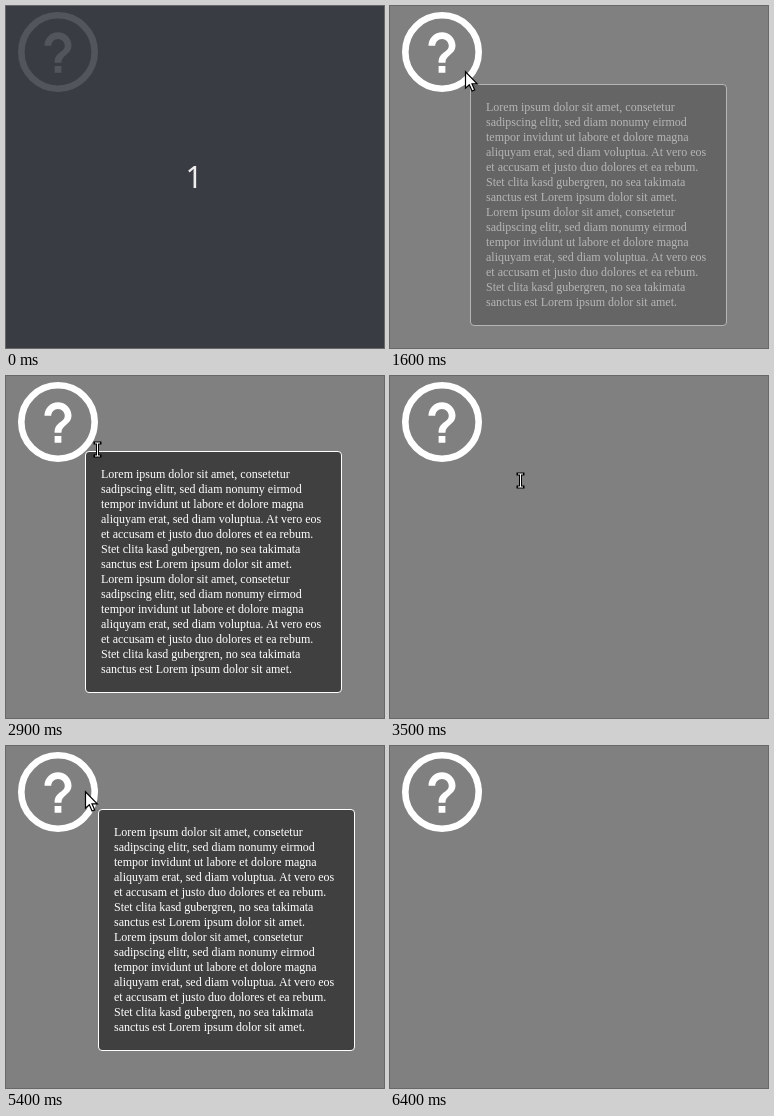
Write an HTML page that moves like this. It is 378x342 px and loops after 8.8 s.

```html
<!DOCTYPE html>
<html lang="en">
<head>
<meta charset="utf-8">
<title>Help tooltip</title>
<style>
html, body { margin: 0; width: 100%; height: 100%; overflow: hidden; background: #808080; }
#stage { position: relative; width: 378px; height: 342px; overflow: hidden; background: #808080; }
#stage > * { position: absolute; left: 0; top: 0; }
#icon { filter: blur(.5px); }
#tip {
  box-sizing: border-box; width: 257px; height: 242px; padding: 15px;
  border: 1px solid #fff; border-radius: 4px; background: #404040; color: #fff;
  font: 12px/15px "Liberation Serif", "Times New Roman", serif;
  white-space: pre; opacity: 0;
}
#count {
  width: 376px; height: 342px; padding-right: 2px; background: rgba(40, 43, 52, .8); color: #eee;
  font: 30px/342px "Noto Sans", sans-serif; text-align: center;
}
</style>
</head>
<body>
<div id="stage">
  <svg id="icon" width="378" height="342" fill="#fff">
    <circle cx="52" cy="46" r="36.7" fill="none" stroke="#fff" stroke-width="6.6"/>
    <path transform="translate(52 46.5) scale(3.38) translate(-12 -12)"
      d="M11 18h2v-2h-2zM12 6c-2.21 0-4 1.79-4 4h2c0-1.1.9-2 2-2s2 .9 2 2c0 2-3 1.75-3 5h2c0-2.25 3-2.5 3-5 0-2.21-1.79-4-4-4z"/>
  </svg>
  <div id="tip"></div>
  <svg width="378" height="342">
    <path id="arrow" d="M.5 .8V17.2L4.3 13.7 7.1 20 9.7 18.9 7 12.8H12.2Z"
      fill="#fff" stroke="#000" stroke-width="1.2"/>
    <g id="beam" fill="none">
      <path d="M-2-6H3M.5-6V7M-2 7H3" stroke="#000" stroke-width="3" stroke-linecap="square"/>
      <path d="M-2-6H3M.5-6V7M-2 7H3" stroke="#fff"/>
    </g>
  </svg>
  <div id="count">1</div>
</div>
<script>
const LOOP = 8800, STEP = 100, FADE = 400;
const ICON = { x: 52, y: 46, r: 40 };
const $ = id => document.getElementById(id);
const tip = $("tip"), arrow = $("arrow"), beam = $("beam"), count = $("count");

const lorem = `Lorem ipsum dolor sit amet, consetetur
sadipscing elitr, sed diam nonumy eirmod
tempor invidunt ut labore et dolore magna
aliquyam erat, sed diam voluptua. At vero eos
et accusam et justo duo dolores et ea rebum.
Stet clita kasd gubergren, no sea takimata
sanctus est Lorem ipsum dolor sit amet.`;
tip.textContent = lorem + "\n" + lorem;

// Moves: start, end, target x, target y
const pointer = {
  from: [280, 319],
  moves: [
    [700, 1500, 92, 89], [1500, 1800, 68, 56],
    [2800, 3500, 130.5, 104], [3600, 3700, 132.5, 109],
    [3800, 4500, 79, 45],
    [5400, 6100, 251, 219], [6200, 6300, 347, 288]
  ]
};
const tipPath = {
  from: [82, 84],
  moves: [[1500, 1800, 79, 75], [4000, 4300, 90, 64], [4300, 4400, 92, 63]]
};
// Tooltip visits: fade-in start, fade-out start
const visits = [[1500, 3000], [4060, 5600]];

const clamp = p => Math.max(0, Math.min(1, p));
const easeOut = p => 1 - (1 - p) ** 3;
const isShown = t => t === 400 || (t >= 700 && t < 6400);

// Approximates the CSS "ease" curve
const fade = p => 1 - (1 - clamp(p) ** 1.2) ** 2.6;

function locate({ from, moves }, t) {
  return moves.reduce(([x, y], [start, end, toX, toY]) => {
    const p = easeOut(clamp((t - start) / (end - start)));
    return [x + (toX - x) * p, y + (toY - y) * p];
  }, from);
}

function render(t) {
  count.style.display = t < 100 ? "" : "none";

  const [x, y] = locate(pointer, t);
  const overIcon = Math.hypot(x - ICON.x, y - ICON.y) < ICON.r;
  arrow.style.display = isShown(t) && overIcon ? "" : "none";
  beam.style.display = isShown(t) && !overIcon ? "" : "none";
  for (const shape of [arrow, beam]) {
    shape.setAttribute("transform", `translate(${Math.floor(x)} ${Math.floor(y)})`);
  }

  const [tx, ty] = locate(tipPath, t).map(Math.round);
  tip.style.transform = `translate(${tx}px, ${ty}px)`;
  tip.style.opacity = visits.reduce((sum, [on, off]) =>
    sum + fade((t - on) / FADE) - fade((t - off) / FADE), 0);
}

const begin = performance.now();
function tick() {
  const t = (performance.now() - begin) % LOOP;
  render(Math.floor(t / STEP) * STEP);
  requestAnimationFrame(tick);
}
tick();
</script>
</body>
</html>
```
